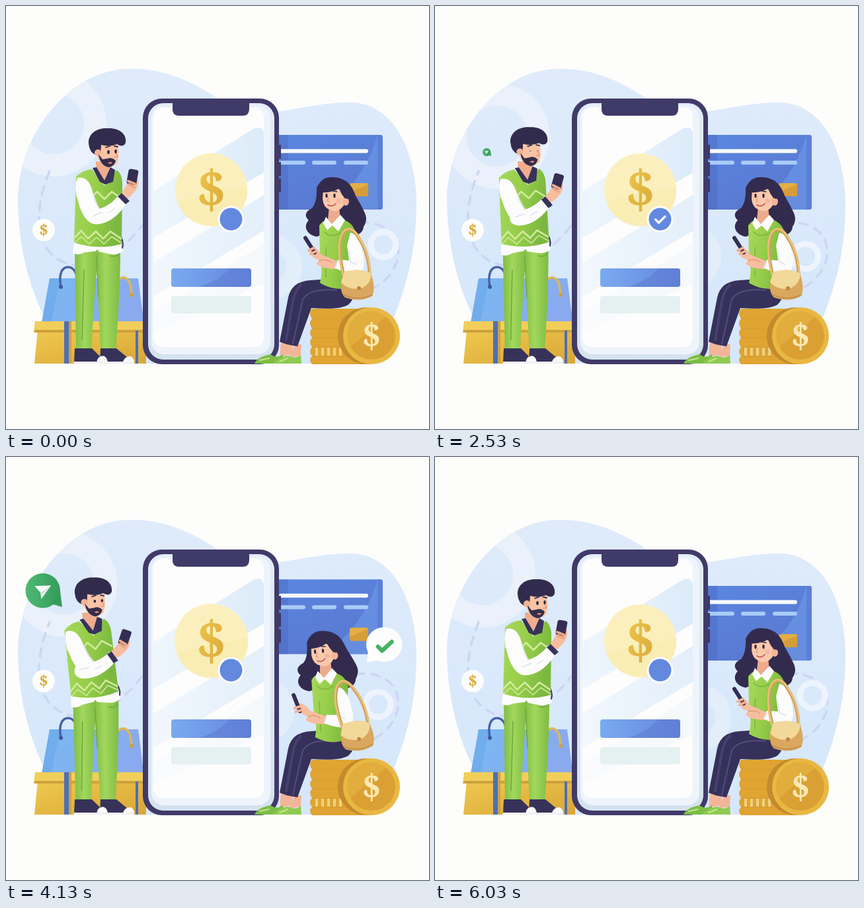
An HTML page that plays this animation: 640 px wide and 640 px high, repeating every 6060 ms.

```html
<!DOCTYPE html>
<html lang="en">
<head>
<meta charset="utf-8">
<title>Mobile payment</title>
<style>
html, body { margin: 0; width: 100%; height: 100%; overflow: hidden; background: #fdfdfc; }
svg { display: block; width: 100vw; height: 100vh; }
text { font: bold 78px "Noto Serif", "Liberation Serif", serif; text-anchor: middle; }
.line { fill: none; stroke-linecap: round; stroke-linejoin: round; }
</style>
</head>
<body>
<svg viewBox="0 0 640 640">
<defs>
  <linearGradient id="sky" x2="0" y2="1"><stop stop-color="#dfebfa"/><stop offset="1" stop-color="#d5e7fc"/></linearGradient>
  <linearGradient id="blue"><stop stop-color="#7aaaf0"/><stop offset="1" stop-color="#6485dc"/></linearGradient>
  <linearGradient id="card" x2=".6" y2="1"><stop stop-color="#5a87e2"/><stop offset="1" stop-color="#5a78cf"/></linearGradient>
  <linearGradient id="bag" x2="1" y2=".3"><stop stop-color="#78b9f2"/><stop offset="1" stop-color="#8aa9ee"/></linearGradient>
  <linearGradient id="gold" x2="1" y2="1"><stop stop-color="#efc94f"/><stop offset="1" stop-color="#d9a637"/></linearGradient>
  <linearGradient id="green" x2="1" y2=".3"><stop stop-color="#a8d95c"/><stop offset=".55" stop-color="#95cd49"/><stop offset="1" stop-color="#7cb840"/></linearGradient>
  <linearGradient id="pants"><stop stop-color="#80bd43"/><stop offset=".4" stop-color="#a2d75d"/><stop offset="1" stop-color="#7ebb42"/></linearGradient>
  <linearGradient id="send"><stop stop-color="#4fb974"/><stop offset="1" stop-color="#349c5c"/></linearGradient>
  <linearGradient id="sheen"><stop stop-color="#eff6fd"/><stop offset="1" stop-color="#dcebf9"/></linearGradient>
  <linearGradient id="bezel" x2="0" y2="1"><stop stop-color="#e2ecf8"/><stop offset="1" stop-color="#d5e2ee"/></linearGradient>
  <clipPath id="sky-clip"><use href="#blob"/></clipPath>
  <clipPath id="glass"><rect x="223" y="154" width="167" height="362" rx="14"/></clipPath>
</defs>

<path id="blob" fill="url(#sky)" d="M18 290C20 195 95 95 188 95C250 95 290 120 330 146C375 182 440 146 520 146C590 146 621 225 621 300C621 400 590 470 555 541H110C45 480 18 380 18 290Z"/>
<g clip-path="url(#sky-clip)" fill="none">
  <circle id="ring-l" cx="72" cy="178" r="63" stroke="#eaf1fb" stroke-width="34"/>
  <circle id="ring-m" cx="399" cy="394" r="37" stroke="#e3eefb" stroke-width="24"/>
</g>
<g class="line" stroke="#ccd5f3" stroke-width="3.500" stroke-linecap="butt">
  <path class="dash" d="M66 250C45 300 45 345 64 370Q85 395 118 392Q170 380 206 332"/>
  <path class="dash" d="M535 328C575 325 600 350 592 385Q582 415 553 428"/>
</g>
<circle id="ring-r" cx="571" cy="361" r="19" fill="none" stroke="#edf4fd" stroke-width="9"/>
<circle cx="57" cy="339" r="17" fill="#fdfdfc"/>
<text x="57" y="347" style="font-size:24px" fill="#d8ab40">$</text>

<!-- bank card -->
<g id="bank">
  <rect x="400" y="195" width="170" height="113" rx="4" fill="url(#card)"/>
  <path d="M484 308Q545 260 562 195H566Q570 195 570 199V304Q570 308 566 308Z" fill="#6f9bea" opacity=".6"/>
  <path d="M562 195H566Q570 195 570 199V304Q570 308 566 308H562Z" fill="#5b80d8"/>
  <path d="M400 195H427V308H400Z" fill="#4662b8" opacity=".35"/>
  <path class="line" d="M416 219.500H545" stroke="#f6fafe" stroke-width="6"/>
  <path class="line" d="M414 237H450M466 237H497M514 237H545" stroke="#a9cbf8" stroke-width="6"/>
  <rect x="520" y="268" width="28" height="20" rx="3" fill="#e5ad45"/>
  <path d="M520 282L548 270V285Q548 288 545 288H523Q520 288 520 285Z" fill="#d59d3a"/>
</g>

<!-- shopping bags -->
<path d="M66 412H200L210 490H52Z" fill="url(#bag)"/>
<path d="M66 412H82L66 490H52Z" fill="#659fe4" opacity=".45"/>
<g class="line" stroke-width="3.500">
  <path d="M83 425C79 403 86 395 94 395Q102 395 106 405" stroke="#4a62a8"/>
  <path d="M170 414Q181 405 188 421L190 436" stroke="#dcb65a"/>
</g>
<circle cx="83" cy="425" r="3" fill="#42569a"/><circle cx="190" cy="437" r="3" fill="#cfa23c"/>
<path d="M48 490H212V541H43Z" fill="url(#gold)"/>
<path d="M44 477H212V493H42Z" fill="#f1ce5a"/>
<path d="M44 490H212V494H42Z" fill="#cda23c"/>
<path d="M88 477H95V541H88ZM196 491H200V541H196Z" fill="#4f6fb4"/>
<path d="M95 477H99V541H95Z" fill="#c9a343"/>

<!-- phone -->
<path d="M410 210H416V231H410ZM410 236H416V257H410ZM410 261H416V281H410Z" fill="#3f3768"/>
<rect x="207" y="140" width="206" height="402" rx="29" fill="#403a69"/>
<rect x="215" y="147" width="191" height="388" rx="23" fill="url(#bezel)"/>
<rect x="220" y="151" width="180" height="376" rx="19" fill="#eef4fb"/>
<rect x="223" y="154" width="167" height="362" rx="14" fill="#fdfdfd"/>
<g clip-path="url(#glass)" fill="url(#sheen)">
  <path d="M223 280L374 186Q390 179 390 196V252L223 351Z"/>
  <path d="M223 388L390 286V340L223 440Z" opacity=".8"/>
  <path d="M223 462L390 360V420L223 495Z" opacity=".25"/>
</g>
<path d="M252 146H368V156Q368 166 358 166H262Q252 166 252 156Z" fill="#403a69"/>
<g id="coin">
  <circle cx="310.500" cy="277.500" r="54.500" fill="#fbf0bd"/>
  <path d="M259 296L365 273A54.500 54.500 0 0 1 259 296Z" fill="#f9ecb0" opacity=".6"/>
  <text x="310.500" y="305" fill="url(#gold)">$</text>
</g>
<circle cx="340.500" cy="322.500" r="20" fill="#fdfdfd"/>
<circle cx="340.500" cy="322.500" r="17" fill="#6289de"/>
<path id="tick" class="line" d="M333.500 323L338.500 328L348 318.500" stroke="#fdfdfd" stroke-width="3.200" pathLength="100"/>
<rect x="250" y="397" width="121" height="28" rx="4" fill="url(#blue)"/>
<path d="M292 425Q325 414 338 397H367Q371 397 371 401V421Q371 425 367 425Z" fill="#5c7bd2" opacity=".5"/>
<rect x="250" y="439" width="121" height="26" rx="4" fill="#e5f0f1"/>

<!-- coin stack -->
<path d="M463 458H550V542H463Q457 535 463 530Q457 522 463 516Q457 508 463 502Q457 494 463 488Q457 480 463 473Q457 465 463 458Z" fill="#dfa432"/>
<path d="M463 473H520M463 488H515M463 502H512M463 516H515M463 530H520" stroke="#cc922b" opacity=".5"/>
<path d="M468 523H515" stroke="#efd180" stroke-width="12" stroke-dasharray="4 5"/>
<circle cx="545" cy="499" r="43" fill="#c48a2c"/>
<circle cx="553" cy="499" r="43" fill="#e9b843"/>
<circle cx="553" cy="499" r="36" fill="#daa033"/>
<path d="M521 516A36 36 0 0 1 575 470Z" fill="#e1ad3d"/>
<text x="553" y="517" style="font-size:50px" fill="#fbe9b4">$</text>

<!-- man -->
<g id="legs">
  <path d="M104 365H140L134 440L129 521H106Z" fill="url(#pants)"/>
  <path d="M136 365H173Q173 430 166 521H143Z" fill="url(#pants)"/>
  <path class="line" d="M137 380L140 440M118 400L115 505M158 378Q168 381 172 373" stroke="#6fa93d" stroke-width="1.500"/>
</g>
<path d="M104 518H130L144 532Q150 538 148 540H103Z" fill="#37325a"/>
<path d="M143 518H167L184 532Q190 537 189 540H142Z" fill="#37325a"/>
<path d="M138 541C136 533 143 528 149 530Q154 533 154 541ZM176 541Q179 529 189 530Q195 534 194 541Z" fill="#fafafa"/>
<path d="M103 539.500H194" stroke="#eef0f4" stroke-width="3"/>
<g id="torso">
  <path d="M104 345L101 374Q110 378 118 373L136 371L138 368L141 372L161 376Q171 376 177 371L174 345Z" fill="#fcfcfd"/>
  <path d="M171 345Q179 355 176 366" class="line" stroke="#37325a" stroke-width="2"/>
  <path d="M106 258Q116 248 130 247L149 272L167 248Q177 254 176 274L175 360Q140 370 103 358Z" fill="url(#green)"/>
  <g class="line" stroke="#d3eba0" stroke-width="2.500">
    <path d="M106 287L117 278L127 291L138 281L149 292L160 281L174 291M103 351L114 340L124 352L136 341L147 352L158 341L174 352"/>
    <path d="M112 304L121 296L132 308M104 358L114 349L126 360L137 350L148 360L160 349L174 358" stroke-width="1.500"/>
  </g>
  <path d="M136 235L158 237L160 256L148 266L136 252Z" fill="#efad8d"/>
  <path d="M131 245L137 244L149 264L158 244L165 248L162 266L150 270L142 266Z" fill="#37325a"/>
  <path id="upper-arm" d="M108 260Q102 275 109 295Q116 323 130 329Q145 333 149 320Q139 309 132 285Q126 256 108 260Z" fill="#fcfcfd"/>
  <path class="line" d="M132 285Q138 305 145 312" stroke="#dde2ec" stroke-width="2"/>
  <g id="forearm">
    <path d="M180 294L174 284L183 270Q182 257 188 254L200 263Q202 276 187 289Z" fill="#f7bd9e"/>
    <rect x="184" y="247" width="15" height="23" rx="3" fill="#332e52" transform="rotate(10 191 258)"/>
    <path class="line" d="M185 265L195 269M186 270L194 274" stroke="#eaa988" stroke-width="4"/>
    <path d="M126 326Q120 313 132 309Q157 305 172 284L184 296Q165 327 140 330Q131 331 126 326Z" fill="#fcfcfd"/>
    <path d="M169 288L175 283L187 295L181 300Z" fill="#37325a"/>
    <path class="line" d="M132 318L145 312M155 313L164 307" stroke="#dde2ec" stroke-width="1.500"/>
  </g>
  <g id="man-head">
    <path d="M137 203Q150 195 168 205Q173 224 168 238Q160 246 149 241Q138 235 136 220Z" fill="#f9c3a5"/>
    <path d="M125 208C124 193 138 184 153 185C173 184 183 195 181 207Q177 215 168 209Q157 214 144 210L143 223L137 226Q126 222 125 208Z" fill="#312c4d"/>
    <circle cx="139" cy="222" r="5" fill="#f3b394"/>
    <path d="M140 224L146 232L153 231Q160 228 166 234Q164 243 155 244Q142 241 140 224Z" fill="#342d4a"/>
    <path d="M154 237Q158 235 161 237Q158 241 154 237Z" fill="#e08878"/>
    <path class="line" d="M166 222L169 228L164 229" stroke="#e6977c" stroke-width="1.500"/>
    <path class="line" d="M151 214L157 212M164 212L169 213" stroke="#342d4a" stroke-width="1.800"/>
    <g id="man-eyes" fill="#29243f"><ellipse cx="155" cy="221" rx="1.800" ry="3"/><ellipse cx="166" cy="220" rx="1.700" ry="3"/></g>
  </g>
</g>
<g id="sent">
  <circle cx="55.500" cy="202" r="26.500" fill="url(#send)"/>
  <path d="M82 203L85 227L68 222Z" fill="#349c5c"/>
  <path d="M43 195L68 194L53 215L52 205Z" fill="#fcfdfc"/>
  <path d="M52 205L68 194L55 207L53 215Z" fill="#c6e6d2"/>
</g>

<!-- woman -->
<path d="M416 508L435 511L432 527L414 531ZM438 511L447 512L446 529L428 532Z" fill="#f3b598"/>
<path d="M376 541Q380 531 400 527Q410 534 419 527L420 541Z" fill="#7cbd46"/>
<path d="M404 541Q412 531 427 529Q437 535 446 528L447 541Z" fill="#8fca50"/>
<path class="line" d="M384 536L398 533M414 538L426 533" stroke="#c4e68c" stroke-width="2"/>
<path d="M474 414H512Q536 435 518 452Q505 460 462 457L441 515L425 512L414 508L427 441Q432 417 460 415Z" fill="#36315a"/>
<path class="line" d="M500 430Q460 426 449 444L434 511" stroke="#544d7c" stroke-width="2"/>
<path class="line" d="M446 422Q437 431 434 447L424 505" stroke="#464070" stroke-width="4"/>
<g id="woman">
  <path id="hair" d="M493 259Q478 258 470 275Q471 297 463 306C450 312 453 320 458 324C448 335 457 347 470 349Q490 344 497 320L512 338C520 353 540 348 541 334C549 321 543 314 539 305C534 295 531 292 527 282Q518 259 493 259Z" fill="#322b4e"/>
  <path d="M474 332Q482 320 500 321Q526 324 529 345L519 426Q497 432 475 419Q480 400 475 380Z" fill="url(#green)"/>
  <path class="line" d="M482 342Q492 352 507 343M484 365V410" stroke="#7db444" stroke-width="1.500"/>
  <path d="M489 303L504 303L506 324L494 333L487 323Z" fill="#ecab8c"/>
  <path d="M484 319L493 330L506 316L513 324L503 341L494 332L486 339L480 329Z" fill="#fcfcfd"/>
  <g id="hands">
    <path d="M459 366Q466 360 477 376L496 384L506 388L501 398Q479 398 470 390L474 384Q460 382 459 366Z" fill="#f7bd9f"/>
    <path class="line" d="M474 385Q486 382 492 388" stroke="#e09b7c" stroke-width="1.500"/>
    <g id="handset"><path class="line" d="M453 351L467 373" stroke="#332e52" stroke-width="6"/>
    <path class="line" d="M458 370L466 366M461 375L469 371" stroke="#f2b294" stroke-width="4"/></g>
    <path d="M521 343Q535 345 540 374Q545 396 536 403Q518 407 497 396L502 384L519 385L516 362Z" fill="#fcfcfd"/>
    <path class="line" d="M519 370L521 387L530 391M502 386L499 394" stroke="#dbe1ec" stroke-width="1.500"/>
  </g>
  <g id="woman-head">
    <path d="M480 276Q494 269 511 282L512 300Q504 314 491 309Q480 305 479 292Z" fill="#fac8ab"/>
    <ellipse cx="514" cy="296" rx="5" ry="6" fill="#f4b598"/>
    <path d="M477 282Q480 262 497 261Q519 263 523 286L516 292Q509 290 504 276Q493 283 477 282Z" fill="#322b4e"/>
    <path class="line" d="M482 280L487 279M495 280L501 281" stroke="#322b4e" stroke-width="1.500"/>
    <g id="woman-eyes" fill="#29243f"><ellipse cx="485" cy="287" rx="1.600" ry="3.200"/><ellipse cx="497" cy="287" rx="1.600" ry="3.200"/></g>
    <path class="line" d="M488 290L486 295L489 296" stroke="#e4957c" stroke-width="1.300"/>
    <path class="line" d="M487 301Q493 305 499 299" stroke="#c45c58" stroke-width="1.700"/>
    <circle cx="503" cy="295" r="3.500" fill="#f2a38f" opacity=".5"/>
  </g>
</g>
<g id="purse">
  <path class="line" d="M511 407Q499 360 511 343Q522 329 535 353Q549 375 550 405" stroke="#d2a058" stroke-width="5"/>
  <path class="line" d="M510 407Q498 360 510 342Q522 328 536 353Q550 375 551 405" stroke="#e9c27b" stroke-width="2.500"/>
  <path d="M513 402Q533 396 552 404Q560 427 554 439Q536 449 513 441Q504 433 508 412Z" fill="#d9a75e"/>
  <path d="M512 402Q532 396 552 404Q554 420 536 428Q516 429 507 418Z" fill="#f2d99a"/>
  <circle cx="534" cy="427" r="3" fill="#c08440"/>
  <path class="line" d="M511 437Q532 447 554 437" stroke="#c08d4a" stroke-width="1.500"/>
</g>
<g id="paid">
  <path d="M548 292L546 311L561 308Z" fill="#fdfdfd"/>
  <ellipse cx="571" cy="285" rx="26" ry="25" fill="#fdfdfd"/>
  <path class="line" d="M562 288L568 294L582 281" stroke="#48b163" stroke-width="6"/>
</g>
</svg>
<script>
const LOOP = 6060, HALF = LOOP / 2;
const el = id => document.getElementById(id);
const move = (id, value) => el(id).setAttribute("transform", value);
const clamp = u => Math.max(0, Math.min(1, u));
const ramp = (t, from, to) => clamp((t - from) / (to - from));
const ease = (t, from, to) => { const u = ramp(t, from, to); return u * u * (3 - 2 * u); };
const hold = (t, a, b, c, d) => ease(t, a, b) - ease(t, c, d);
const bump = (t, from, to) => Math.sin(Math.PI * ramp(t, from, to)) ** 2;
const shift = (x, y) => `translate(${x} ${y})`;
const turn = (a, x, y) => `rotate(${a} ${x} ${y})`;
const scale = (sx, sy, x, y) => `translate(${x} ${y}) scale(${sx} ${sy}) translate(${-x} ${-y})`;
// lids close half way through a turn of the head
const lids = u => Math.max(.12, clamp(Math.abs(2 * u - 1) * 2 - .3));

// speech bubble: overshoots when it opens, shrinks back into its tail
function pop(t, open, close) {
  const v = ramp(t, open, open + 520) - 1;
  return (1 + 2.9 * v ** 3 + 1.9 * v ** 2) * (1 - ease(t, close, close + 460));
}

function draw(t) {
  const h = t % HALF;
  const drift = (1 - Math.cos(2 * Math.PI * t / LOOP)) / 2;
  move("ring-l", shift(23 * drift, 20 * drift));
  move("ring-m", shift(-16 * drift, -16 * drift));
  move("ring-r", shift(-11 * drift, 19 * drift));
  for (const d of document.querySelectorAll(".dash")) {
    d.setAttribute("stroke-dasharray", "13 11");
    d.setAttribute("stroke-dashoffset", -24 * 4 * t / LOOP);
  }
  move("bank", shift(0, -2.8 * bump(t, 970, 2530) - 10 * bump(t, 2530, 6030)));

  const size = 1 + .09 * bump(h, 170, 1270);
  move("coin", scale(size, size, 310.5, 277.5));

  const c = t % (LOOP / 3) / (LOOP / 3);
  const start = 100 * ramp(c, .62, .82), end = 100 * ramp(c, .05, .2);
  el("tick").setAttribute("stroke-dasharray", `0 ${start} ${Math.max(0, end - start)} 200`);
  el("tick").style.visibility = end > start ? "visible" : "hidden";

  const lean = hold(h, 690, 1290, 2190, 2790);
  move("legs", `translate(0 540) skewX(${1.2 * lean}) translate(0 -540)`);
  move("torso", shift(-4 * lean, -lean) + turn(-10 * lean, 138, 370));
  move("man-head", shift(0, -2 * lean) + turn(8 * lean, 148, 245));
  move("forearm", shift(-14 * lean, 2 * lean) + turn(22 * lean, 130, 318));
  move("man-eyes", scale(1, lids(lean), 160, 221));
  const sent = pop(h, 925, 2215);
  move("sent", scale(sent, sent, 85, 227));

  const nod = hold(h, 100, 650, 1650, 2350);
  move("woman", shift(-7 * nod, 4 * nod) + turn(-3 * nod, 495, 425));
  move("woman-head", shift(-2 * nod, 2 * nod) + turn(-3 * nod, 497, 312));
  move("hands", shift(-8 * nod, 2 * nod));
  move("handset", shift(-2 * nod, 2 * nod) + turn(14 * nod, 460, 362));
  move("woman-eyes", scale(1, lids(nod), 491, 287));
  move("purse", turn(-6 * nod, 531, 425));
  const paid = pop(h, 680, 2000);
  move("paid", scale(paid, paid, 546, 311));
}

const begin = performance.now();
function frame() {
  draw((performance.now() - begin) % LOOP);
  requestAnimationFrame(frame);
}
frame();
</script>
</body>
</html>
```
